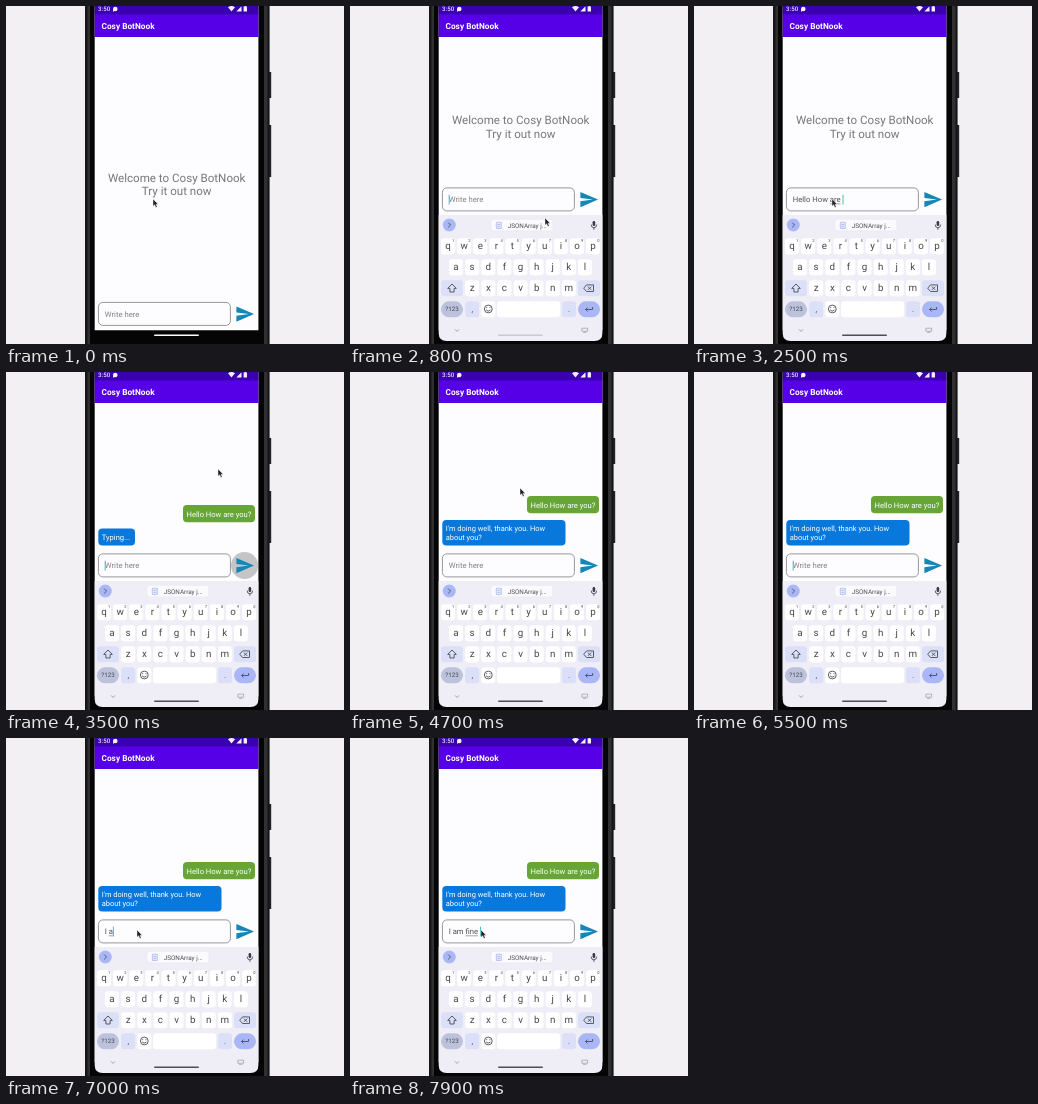
An HTML page for the animation above (8 s loop, 338 by 338 pixels).

```html
<!DOCTYPE html>
<html lang="en">
<head>
<meta charset="utf-8">
<title>Chat app demo</title>
<style>
  html, body { margin: 0; width: 100%; height: 100%; overflow: hidden; background: #f2f0f3; }
  svg { display: block; width: 100vw; height: 100vh; }
  text { font: 7.6px Roboto, Arial, sans-serif; white-space: pre; text-rendering: geometricPrecision; }
  .mid { text-anchor: middle; }
  .key { fill: #44464c; }
  .line { fill: none; stroke: #4a4d56; stroke-width: .9; }
</style>
</head>
<body>
<svg viewBox="0 0 338 338">
  <defs>
    <clipPath id="screen"><path d="M88.7 0H252.4V327Q252.4 335 244.4 335H96.7Q88.7 335 88.7 327Z"/></clipPath>
  </defs>

  <!-- phone body -->
  <path d="M262 66h3.2v26H262zM262 119h3.2v52H262z" fill="#222326"/>
  <path d="M79 0H263.6V338H79z" fill="#161618"/>
  <path d="M81.5 0H84V338H81.5zM258 0H261.5V338H258z" fill="#303033"/>
  <path d="M84 0H258V338H84z" fill="#050506"/>

  <g clip-path="url(#screen)">
    <path d="M88 0H253V324.3H88z" fill="#fdfcfe"/>
    <path d="M88 8H253V31H88z" fill="#5600e8"/>
    <path d="M88 0H253V8.6H88z" fill="#3a00b0"/>
    <text x="92" y="5.4" fill="#e6def6" style="font-size:6.2px;font-weight:500">3:50</text>
    <g fill="#f4f0fb">
      <circle cx="109.3" cy="3" r="2.3"/><path d="M107 3v2.8l2-1z"/>
      <path d="M222 1.2Q225.5 -1 229 1.2L225.5 5.6zM230.3 5.6h5.2V.2zM237.6 .6h1v-.6h1.4v.6h1v5h-3.4z"/>
    </g>
    <text x="95.5" y="23.2" fill="#fff" style="font-size:8.3px;font-weight:700">Cosy BotNook</text>

    <g id="welcome" class="mid" fill="#77767a">
      <text x="170.7" y="175.8" style="font-size:11.6px">Welcome to Cosy BotNook</text>
      <text x="170.7" y="189.4" style="font-size:11.6px">Try it out now</text>
    </g>

    <g id="question">
      <rect x="177" y="133" width="72" height="17.2" rx="4" fill="#67a536"/>
      <text x="180.5" y="144.6" fill="#fff">Hello How are you?</text>
    </g>
    <g id="typing">
      <rect x="92.3" y="156.4" width="36.7" height="17.2" rx="4" fill="#0878dc"/>
      <text x="95.7" y="168" fill="#fff">Typing...</text>
    </g>
    <g id="reply" fill="#fff">
      <rect x="92.3" y="148" width="123.2" height="25.4" rx="4" fill="#0878dc"/>
      <text x="95.7" y="159" style="font-size:7.45px">I'm doing well, thank you. How</text>
      <text x="95.7" y="168" style="font-size:7.45px">about you?</text>
    </g>

    <g id="composer">
      <rect x="92.4" y="296.4" width="132" height="23" rx="4.5" fill="#fdfcfe" stroke="#98979c"/>
      <text id="draft" x="98.7" y="310.8" style="font-size:7.7px"></text>
      <path id="under" stroke="#666" stroke-width=".6"/>
      <path id="caret" stroke="#35b8b4" stroke-width=".9"/>
      <circle id="ripple" cx="238.6" cy="308" r="13.6" fill="#c5c5c8"/>
      <path transform="translate(228.7 298) scale(.84)" fill="#1686b5" d="M2 21L23 12 2 3V10L17 12 2 14z"/>
    </g>

    <g id="keyboard">
      <path d="M88 209H253V336H88z" fill="#efeef6"/>
      <circle cx="99.3" cy="219" r="6.5" fill="#a9b7f7"/>
      <path class="line" d="M98.2 216.6l2.4 2.4-2.4 2.4"/>
      <rect x="141" y="213.3" width="62" height="11.6" rx="3" fill="#fbfbfe" stroke="#e4e4ec" stroke-width=".6"/>
      <path d="M146.3 216.2h5v6.4h-5zM147.5 218.5h2.6M147.5 220.5h2.6" fill="#e2e8ff" stroke="#a5b3e6" stroke-width=".7"/>
      <text x="157.7" y="221.5" fill="#4a4c53" style="font-size:6.35px">JSONArray j...</text>
      <rect x="242.6" y="214.9" width="2.6" height="5.2" rx="1.3" fill="#3a3c43"/>
      <path class="line" d="M241.2 218.6q0 3.2 2.7 3.2t2.7-3.2M243.9 221.8v2"/>
      <g id="keys"></g>
      <path class="line" d="M102 278l4.3 4.4h-2.2v3.6h-4.2v-3.6h-2.2z"/>
      <path class="line" d="M236.5 278.9h7v6.6h-7l-2.8-3.3zM237.9 280.6l3.3 3.3m0-3.3l-3.3 3.3"/>
      <path class="line" d="M242.6 301v2.5h-7m2-2l-2 2 2 2"/>
      <circle class="line" cx="138.3" cy="303" r="3.9"/>
      <path class="line" d="M136.2 304q2.1 2.3 4.2 0M136.7 301.2v1M139.9 301.2v1"/>
      <path class="line" d="M105 323.4l2 2 2-2" stroke-opacity=".55"/>
      <path class="line" d="M231.8 322.2h5.8v3h-5.8zM233 326.4h3.4" stroke-opacity=".4" stroke-width=".7"/>
    </g>
  </g>

  <rect id="home" x="148" y="328.5" width="45" height="1.6" rx=".8"/>
  <path id="pointer" d="M0 0V7.2L1.7 5.7 2.9 8.4 4.2 7.8 3 5.2H5.2z" fill="#222" stroke="#fff" stroke-width=".4"/>
</svg>

<script>
const LOOP = 8000, FOCUS = 520, SEND = 3210, REPLY = 4050, LIFT = 114.5;
const $ = id => document.getElementById(id);
const show = (id, on) => $(id).setAttribute('display', on ? 'inline' : 'none');
const move = (id, x, y) => $(id).setAttribute('transform', `translate(${x} ${y})`);

// Keyboard
const key = (x, y, w, label = '', fill = '#fff', size = 9.8, round = 3) =>
  `<rect x="${x - w / 2}" y="${y - 8}" width="${w}" height="16" rx="${round}" fill="${fill}"/>
   <text class="mid key" x="${x}" y="${y + size * .32}" style="font-size:${size}px">${label}</text>`;
const row = (letters, x0, y) => [...letters].map((c, i) => key(x0 + i * 16.12, y, 14, c)).join('');
const digits = [...'1234567890'].map((d, i) =>
  `<text class="mid key" x="${103.2 + i * 16.12}" y="236.4" style="font-size:4px">${d}</text>`).join('');
const pale = '#dbe0f8';
$('keys').innerHTML = row('qwertyuiop', 98, 240.3) + digits + row('asdfghjkl', 106, 261.3) +
  row('zxcvbnm', 122.2, 282.3) +
  key(102, 282.3, 22, '', pale) + key(239, 282.3, 22, '', pale) +
  key(102, 303.3, 22, '?123', '#bcc2dc', 6.2, 8) + key(122.2, 303.3, 14, ',', pale, 8) +
  key(138.3, 303.3, 14) + key(178.6, 303.3, 63) +
  key(219, 303.3, 14, '.', pale, 8) + key(239, 303.3, 22, '', '#a9b7f7', 8, 8);

// Typed messages: text, first key time, ms per key, time cleared
const drafts = [
  { text: 'Hello How are you?', from: 1250, step: 92, end: SEND },
  { text: 'I am fine ', from: 6700, step: 120, end: LOOP }
];

// Pointer stops: time, x, y
const stops = [
  [0, 147, 193], [320, 150, 305], [480, 150, 305], [800, 195, 212], [1300, 138, 193],
  [2850, 138, 193], [3120, 238, 193], [3230, 238, 193], [3500, 212, 97],
  [4000, 180, 112], [4700, 170, 116], [5400, 170, 116], [6600, 131, 192], [8000, 131, 192]
];
const ease = p => p * p * (3 - 2 * p);
const clamp = p => Math.max(0, Math.min(1, p));

function pointerAt(t) {
  const i = stops.findIndex(s => s[0] > t);
  const [a, ax, ay] = stops[i - 1], [b, bx, by] = stops[i];
  const p = ease((t - a) / (b - a));
  return [ax + (bx - ax) * p, ay + (by - ay) * p];
}

function drawDraft(t) {
  const d = drafts.find(d => t >= d.from && t < d.end);
  const count = d ? Math.min(d.text.length, 1 + Math.floor((t - d.from) / d.step)) : 0;
  const typed = d ? d.text.slice(0, count) : '';
  const draft = $('draft');
  draft.textContent = typed || 'Write here';
  draft.setAttribute('fill', typed ? '#505054' : '#828186');

  const width = n => n ? draft.getSubStringLength(0, n) : 0;
  const end = typed.trimEnd().length, start = typed.trimEnd().lastIndexOf(' ') + 1;
  $('under').setAttribute('d', typed ? `M${98.7 + width(start)} 312.3H${98.7 + width(end)}` : '');

  const x = 99.2 + (typed ? width(count) : 0);
  $('caret').setAttribute('d', `M${x} 303.2V313`);
  const last = d ? d.from + (count - 1) * d.step : t >= SEND ? SEND : FOCUS;
  show('caret', t >= FOCUS && (t - last) % 1000 < 490);
}

function draw(t) {
  const slide = ease(clamp((t - FOCUS) / 200));
  const lift = t >= FOCUS + 60;
  move('keyboard', 0, (1 - slide) * 127);
  move('composer', 0, lift ? -LIFT : 0);
  move('welcome', 0, lift ? -57.5 : 0);
  $('home').setAttribute('fill', t < FOCUS ? '#fff' : t < 1000 ? '#c9cad0' : '#4c4e55');

  show('welcome', t < SEND);
  show('question', t >= SEND);
  move('question', 0, t < REPLY ? 0 : -9);
  show('typing', t >= SEND && t < REPLY);
  show('reply', t >= REPLY);

  const pressed = t - SEND + 60;
  $('ripple').setAttribute('opacity', pressed < 0 ? 0 : clamp(pressed / 80) * clamp((650 - pressed) / 280));
  drawDraft(t);

  show('pointer', t < 5400 || t >= 6600);
  move('pointer', ...pointerAt(t));
}

const begin = performance.now();
function tick() {
  draw((performance.now() - begin) % LOOP);
  requestAnimationFrame(tick);
}
tick();
</script>
</body>
</html>
```
